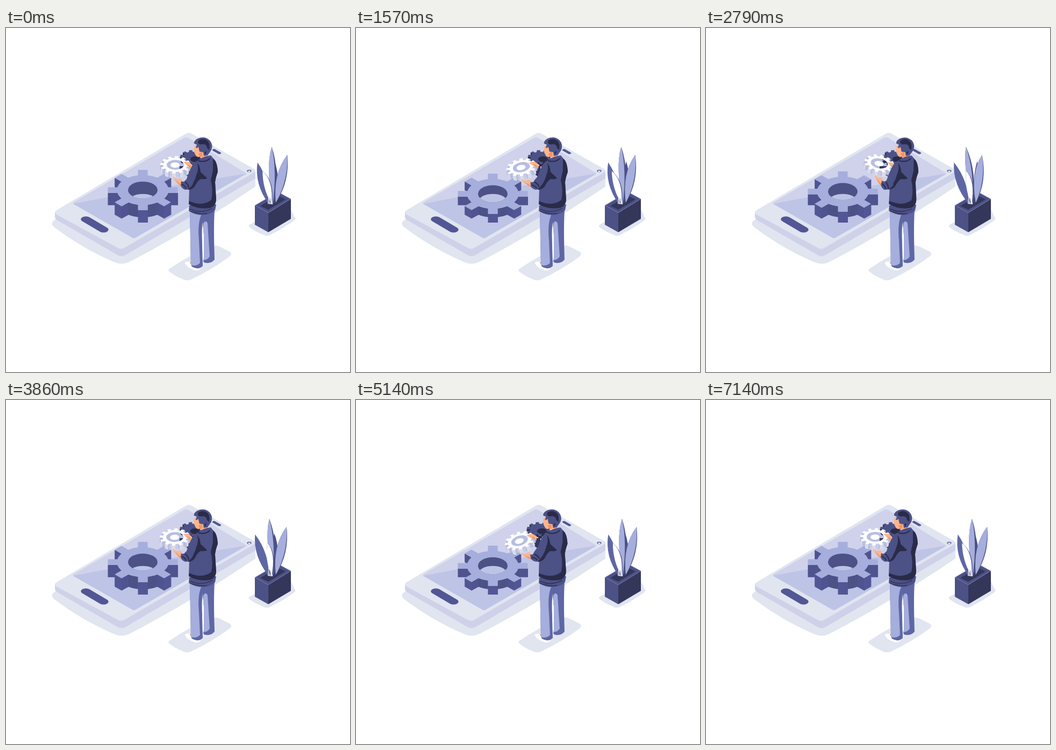
An HTML page with a canvas that plays this animation: 640x640 px, repeating every 7.21 s.

```html
<!DOCTYPE html>
<html>
<head>
<meta charset="utf-8">
<style>
  html, body { margin: 0; width: 100%; height: 100%; overflow: hidden; background: #fff; }
  canvas { display: block; width: 640px; height: 640px; }
</style>
</head>
<body>
<canvas id="stage" width="640" height="640"></canvas>
<script>
const ctx = document.getElementById('stage').getContext('2d');
const LOOP = 7210, TAU = Math.PI * 2, ISO = 0.577;
const PALE = '#e0e5f0', LILAC = '#cfd2ea', SKY = '#a5aedc', MID = '#5e67a4',
      BLUE = '#4c5186', VIOLET = '#525695', NIGHT = '#2a2b49', SKIN = '#fdb58a', SHADE = '#f29468';

function shape(path, color) {
  ctx.fillStyle = color;
  ctx.fill(new Path2D(path));
}

function line(path, color, width) {
  ctx.strokeStyle = color;
  ctx.lineWidth = width;
  ctx.lineCap = 'round';
  ctx.stroke(new Path2D(path));
}

function oval(x, y, rx, color) {
  ctx.beginPath();
  ctx.ellipse(x, y, rx, rx * ISO, 0, 0, TAU);
  ctx.fillStyle = color;
  ctx.fill();
}

// A round-ended slot lying flat in the isometric plane.
function slot(x1, y1, x2, y2, width) {
  ctx.save();
  ctx.scale(1, ISO);
  line(`M${x1} ${y1 / ISO}L${x2} ${y2 / ISO}`, VIOLET, width);
  ctx.restore();
}

function turned(x, y, degrees, draw) {
  ctx.save();
  ctx.translate(x, y);
  ctx.rotate(degrees * TAU / 360);
  ctx.translate(-x, -y);
  draw();
  ctx.restore();
}

// Outline of a gear lying in the isometric plane; each point names the kind of edge that follows it.
function gearOutline(x, y, g) {
  const points = [];
  const add = (px, py, kind) => points.push({ x: x + px, y: y + py * ISO, kind });
  const step = TAU / g.teeth, root = Math.asin(g.half / g.body);
  const reach = Math.sqrt(g.body ** 2 - g.half ** 2);
  for (let i = 0; i < g.teeth; i++) {
    const a = i * step + (g.turn || 0), c = Math.cos(a), s = Math.sin(a);
    const local = (r, w, kind) => add(r * c - w * s, r * s + w * c, kind);
    local(reach, -g.half, 'side');
    local(g.outer, -g.half, 'tip');
    local(g.outer, g.half, 'side');
    for (let k = 0; k < 5; k++) {
      const b = a + root + (step - 2 * root) * k / 5;
      add(g.body * Math.cos(b), g.body * Math.sin(b), 'wall');
    }
  }
  return points;
}

function gear(x, y, height, g) {
  const points = gearOutline(x, y, g);
  points.map((p, i) => ({ p, q: points[(i + 1) % points.length] }))
    .filter(e => e.q.x < e.p.x - 0.01)
    .sort((a, b) => a.p.y + a.q.y - b.p.y - b.q.y)
    .forEach(({ p, q }) => {
      // The half-pixel overlap closes the seams between neighbouring faces.
      shape(`M${p.x + 0.5} ${p.y}L${q.x} ${q.y}V${q.y + height}L${p.x + 0.5} ${p.y + height}Z`, g[p.kind]);
    });
  ctx.beginPath();
  points.forEach(p => ctx.lineTo(p.x, p.y));
  ctx.closePath();
  if (g.hole) {
    ctx.moveTo(x + g.hole, y);
    ctx.ellipse(x, y, g.hole, g.hole * ISO, 0, 0, TAU);
  }
  ctx.fillStyle = g.top;
  ctx.fill('evenodd');
}

const BIG = { teeth: 8, outer: 65, body: 48, half: 9, hole: 27.5,
  top: SKY, tip: VIOLET, side: '#4f538f', wall: BLUE };
const WHITE = { teeth: 12, outer: 28, body: 22.5, half: 3.2, hole: 16, turn: 0.1,
  top: '#fff', tip: '#d9dcee', side: '#b9bedd', wall: '#c8cce5' };
const DARK = { teeth: 10, outer: 22, body: 17, half: 3, turn: 0.2,
  top: BLUE, tip: NIGHT, side: NIGHT, wall: NIGHT };

function phone() {
  shape('M97 352L87 360Q83 364 89 370Q140 409 200 435Q215 442 230 435Q350 372 464 295V280L340 215Z', PALE);
  shape('M91 342V351Q91 355 96 358L207 422Q215 427 223 422L464 280V266Z', '#cfd1e9');
  shape('M94 339L334 197Q340 193 346 197L461 262Q467 266 461 269L222 408Q214 414 206 408L94 347Q88 343 94 339Z', PALE);
  shape('M126 324L332 204Q336 202 340 205L445 269Q449 271 445 273L241 390Q238 392 235 390L126 328Q123 326 126 324Z', LILAC);
  shape('M125 327Q285 296 447 271L241 390Q238 392 235 390Z', '#bdc4e5');
  slot(148.5, 355.8, 181.5, 375.2, 18.5);
  slot(387, 227, 397, 232.8, 6.2);
  oval(452.5, 266, 4, VIOLET);
  oval(452.5, 266.6, 2.6, '#dfe3f2');
}

function bigGear(drop) {
  const x = 254.5, floor = 324.5, y = 301.5 + drop;
  gear(x, y, floor - y, BIG);
  oval(x, y, 27.5, BLUE);
  ctx.save();
  ctx.beginPath();
  ctx.ellipse(x, y, 27.5, 27.5 * ISO, 0, 0, TAU);
  ctx.clip();
  oval(x, floor, 27.5, '#bcc3e5');
  ctx.restore();
}

function heldGears(angle) {
  const held = draw => turned(333, 293, angle, draw);
  held(() => oval(315, 255, 17, '#b7bee1'));
  ctx.save();
  ctx.translate(angle * 0.35, 0);
  gear(346, 240, 5, DARK);
  oval(352, 244, 9, NIGHT);
  ctx.restore();
  shape('M323 257L343 257V274L338 276L331 271V266L323 262Z', '#33365f');
  held(() => {
    gear(315, 254.5, 9, WHITE);
    oval(314.5, 255, 8.5, '#fff');
    shape('M330 250Q337 247 342 250L348 256L345 264L340 257Z', SKIN);
    shape('M334 253L343 256L345 263L340 258Z', SHADE);
  });
}

function legs() {
  shape('M304 448Q340 423 380 407Q388 403 396 406L416 416Q422 420 416 425Q384 449 346 467Q337 472 328 467Q315 462 305 454Q300 451 304 448Z', PALE);
  shape('M333 436Q338 433 344 436L350 444L362 447Q360 452 352 451Q336 446 333 438Z', '#fff');
  shape('M342 436L346 435V443Z', '#c98a72');
  shape('M365 344L388 340Q386 370 388 431Q380 440 368 436L367 432Q373 425 369 390L366 366Z', MID);
  shape('M367 364Q371 356 375 363Q377 395 379 425Q375 432 367 432Z', SKY);
  shape('M342 339L370 345Q363 360 365 400L366 443Q357 451 346 444L344 440Z', MID);
  shape('M342 339L364 346Q356 362 359 395L361 437Q355 444 344 441Z', SKY);
  shape('M365 384Q367 374 368 386L368 428L366 434Z', '#fff');
}

function torso() {
  shape('M341 330L340 340Q353 349 368 348Q382 346 389 339L391 328Z', BLUE);
  line('M343 337Q362 346 383 336M342 341Q362 347 374 345', NIGHT, 1.2);
  shape('M357 246Q368 238 381 237L386 243Q393 249 394 267Q390 278 389 287L391 319Q391 330 382 334Q360 339 340 327L341 300Q331 302 327 295L335 284Q342 262 349 252Z', BLUE);
  shape('M385 243Q393 247 394 268Q390 279 389 287L391 318Q391 329 382 334Q360 339 340 328L341 322Q365 333 382 320Q386 302 381 283L385 265Z', NIGHT);
  shape('M356 251Q361 257 362 268L374 279Q373 282 362 281Q357 283 351 295Q346 301 338 301Q351 288 354 274Q359 263 356 251Z', NIGHT);
  line('M358 247Q370 251 379 243', NIGHT, 2);
}

function head() {
  shape('M351 219Q348 229 352 235Q355 242 361 239L363 243L375 239L374 225L364 216Z', SKIN);
  shape('M358 234L365 230L366 240L361 239Z', SHADE);
  shape('M350 215Q349 210 356 206Q369 200 379 209Q386 217 382 227L375 237L368 238L367 231L360 230L358 221Q356 224 353 223L355 217Z', BLUE);
  shape('M358 209Q368 203 376 211Q380 216 378 227L374 223Q374 217 367 216Q359 218 357 213Z', NIGHT);
  shape('M369 231L373 229L371 236Z', NIGHT);
  line('M362 241Q370 241 376 238', '#f7d3c3', 1.2);
}

function forearm(angle) {
  turned(333, 293, angle, () => {
    shape('M310 276Q313 277 317 281L325 280L329 286L327 296L321 290Q312 284 310 276Z', SKIN);
    shape('M314 282L324 290L327 296L320 290Z', SHADE);
    shape('M326 285Q331 288 334 283L346 274L348 290Q342 301 333 301Q326 298 325 292Z', BLUE);
    line('M328 291Q334 295 335 298M334 287Q339 291 340 297', NIGHT, 2);
  });
}

function pot() {
  shape('M453 366L525 327L537 352Q541 355 536 358Q516 373 493 384Q485 389 478 384Q466 380 455 372Q450 369 453 366Z', PALE);
  shape('M463 330L488 344V380L463 366Z', BLUE);
  shape('M488 344L530 318V355L488 380Z', '#34365a');
  shape('M463 330L506 305L530 318L488 344Z', '#565b95');
  shape('M466 330L506 307L527 318L488 342Z', BLUE);
  shape('M473 331L506 312L520 319L488 338Z', '#34365a');
}

// A leaf bends by moving its tip fully and the middle of both edges by half as much.
function leaf(sway, [tipX, tipY], [baseX, baseY], [leftX, leftY], [rightX, rightY], color) {
  const h = sway / 2;
  shape(`M${baseX} ${baseY}Q${leftX + h} ${leftY} ${tipX + sway} ${tipY}Q${rightX + h} ${rightY} ${baseX} ${baseY}Z`, color);
}

function plant(u) {
  const phase = 4 * u - 0.06 * Math.sin(TAU * u);
  const wave = lead => Math.cos(TAU * (phase + lead));
  pot();
  leaf(-3 * wave(-0.1), [502, 248], [500, 328], [493, 282], [514, 284], BLUE);
  const middle = 6 * wave(0.07);
  leaf(middle, [489, 221], [497, 329], [480, 258], [507, 266], BLUE);
  leaf(middle, [489, 221], [496, 329], [480, 258], [502, 266], SKY);
  const right = 5 * wave(-0.03);
  leaf(right, [518.5, 236], [502, 325], [494, 271], [526, 285], BLUE);
  leaf(right, [518.5, 236], [502, 325], [494, 271], [523, 284], SKY);
  leaf(5 * wave(0.13), [464.5, 250], [489, 328], [460, 290], [490, 284], MID);
  const white = -4.8 * wave(0.2) - 2.3 * Math.cos(TAU * u);
  leaf(white, [481, 266], [495, 328], [479, 298], [502, 284], BLUE);
  leaf(white, [481, 266], [494, 328], [479, 298], [500, 284], '#fff');
  shape('M487 327L488 313L491 327L493 315L496 328Z', '#fff');
  line('M489 327L487 314M493 327L491 317', BLUE, 0.8);
}

function draw(now) {
  const u = now % LOOP / LOOP;
  const a = 2 * TAU * u, rise = 1 - Math.cos(a), swing = -Math.sin(a) * rise, drift = Math.sin(TAU * u);
  const arm = 13 * swing - 2.2 * rise + 2.4 * drift;
  const lean = 3.2 * swing + 0.9 * rise + 0.6 * drift;
  const sink = rise / 2, eased = sink * sink * (3 - 2 * sink);

  ctx.fillStyle = '#fff';
  ctx.fillRect(0, 0, 640, 640);
  phone();
  bigGear(7 * eased);
  heldGears(arm);
  legs();
  turned(365, 340, lean * 0.24, () => {
    ctx.save();
    ctx.translate(lean * 0.5, 0);
    head();
    ctx.restore();
    torso();
  });
  forearm(arm);
  plant(u);
}

const start = performance.now();
function tick() {
  draw(performance.now() - start);
  requestAnimationFrame(tick);
}
tick();
</script>
</body>
</html>
```
